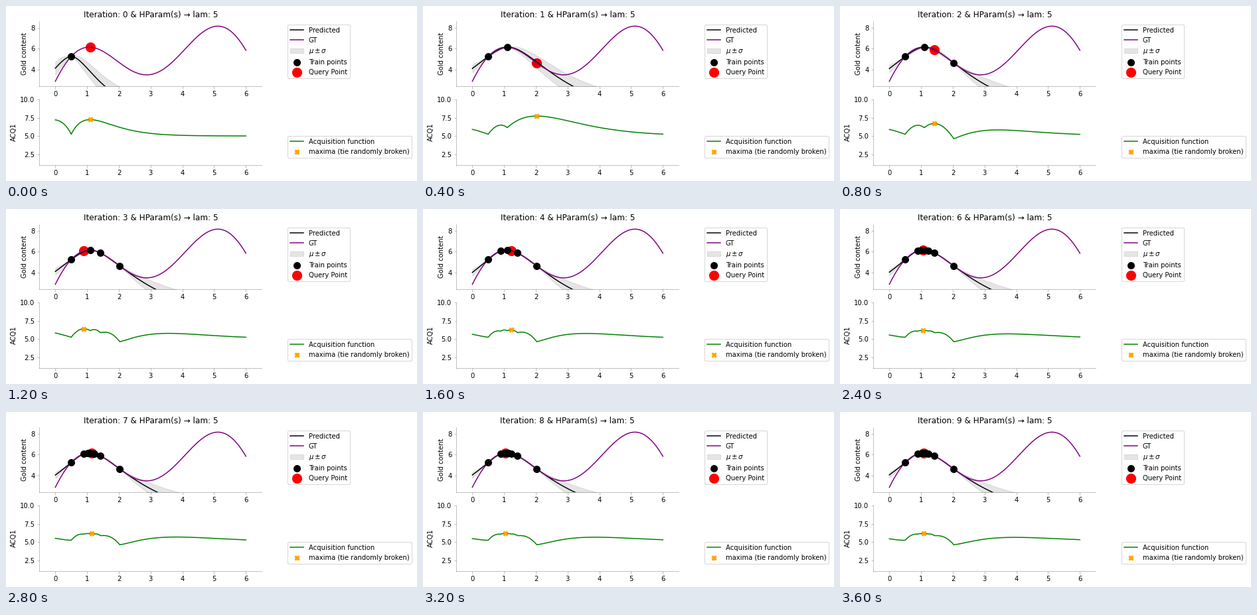
Animation, 619 px wide and 264 px high, one loop 4 s. Source, as a matplotlib script:

```python
import numpy as np
import matplotlib.pyplot as plt
from matplotlib.animation import FuncAnimation

W, H, DPI = 619, 264, 72
STEPS, LAM = 10, 5
FAINT = (0, 0, 0, 0.3)
plt.rcParams.update({"font.family": "DejaVu Sans", "font.size": 10})

grid = np.linspace(0, 6, 601)


def truth(x):
    u = x - 3
    return 2 * u * np.sin(u) + u / 2 + 3.5


def matern(a, b, scale):
    d = np.sqrt(3) * np.abs(a[:, None] - b[None, :]) / scale
    return (1 + d) * np.exp(-d)


def factor(x, scale):
    return np.linalg.cholesky(matern(x, x, scale) + 1e-10 * np.eye(len(x)))


def log_likelihood(x, y, scale):
    low = factor(x, scale)
    return -0.5 * np.sum(np.linalg.solve(low, y) ** 2) - np.log(np.diag(low)).sum()


def posterior(x, y):
    scale = 1.0
    if len(x) > 1:
        scale = max(np.geomspace(0.3, 10, 500), key=lambda s: log_likelihood(x, y, s))
    low = factor(x, scale)
    v = np.linalg.solve(low, matern(x, grid, scale))
    mu = v.T @ np.linalg.solve(low, y)
    return mu, np.sqrt(np.clip(1 - np.sum(v ** 2, axis=0), 0, None))


def run():
    xs, steps = np.array([0.5]), []
    for _ in range(STEPS):
        mu, sigma = posterior(xs, truth(xs))
        acq = mu + LAM * sigma
        best = np.argmax(acq)
        steps.append((xs, mu, sigma, acq, best))
        xs = np.append(xs, grid[best])
    return steps


steps = run()
gold = truth(grid)

fig = plt.figure(figsize=(W / DPI, H / DPI), dpi=DPI, facecolor="white")


def add_axes(bottom):
    return fig.add_axes([50.4 / W, bottom / H, 334.8 / W, 98.84 / H])


top, low_ax = add_axes(142.6), add_axes(24)


def style(ax, label, ylim, anchor):
    ax.set_xlim(-0.5, 6.5)
    ax.set_ylim(*ylim)
    ax.set_ylabel(label)
    ax.tick_params(color=FAINT)
    for side, spine in ax.spines.items():
        spine.set_visible(side in ("left", "bottom"))
        spine.set_color(FAINT)
    ax.legend(loc="upper left", bbox_to_anchor=(1.1, anchor))


def draw(i):
    xs, mu, sigma, acq, best = steps[i]
    query = grid[best]
    top.clear()
    low_ax.clear()

    top.plot(grid, mu, color="black", label="Predicted")
    top.plot(grid, gold, color="purple", label="GT")
    top.fill_between(grid, mu - sigma, mu + sigma, color="black", alpha=0.1,
                     label=r"$\mu \pm \sigma$")
    top.scatter(xs, truth(xs), s=100, color="black", zorder=10, label="Train points")
    top.scatter(query, truth(query), s=200, color="red", zorder=0.5, label="Query Point")
    top.set_title(f"Iteration: {i} & HParam(s) → lam: {LAM}")
    style(top, "Gold content", (gold.min() - 0.5, gold.max() + 0.5), 1)

    low_ax.plot(grid, acq, color="green", label="Acquisition function")
    low_ax.scatter(query, acq[best], s=50, marker="X", color="orange", zorder=10,
                   label="maxima (tie randomly broken)")
    low_ax.set_yticks([2.5, 5, 7.5, 10])
    style(low_ax, "ACQ1", (1, 10), 0.5)
    return []


anim = FuncAnimation(fig, draw, frames=STEPS, init_func=lambda: [],
                     interval=400, repeat=True, repeat_delay=0)
plt.show()
```
